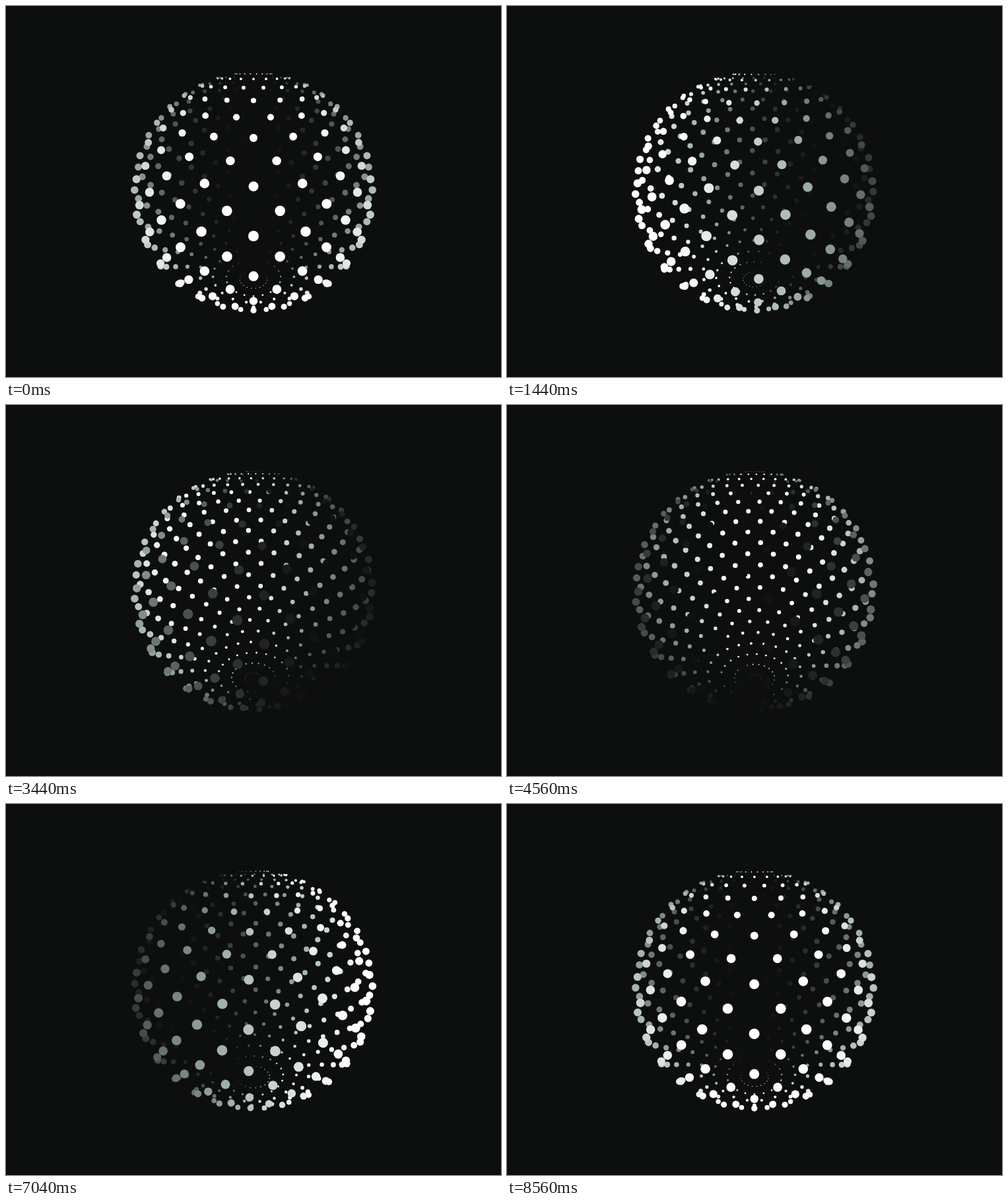
Recreate the animation shown at these times as an HTML page with a canvas. Size 750x562 px, loop 8640 ms.

```html
<!DOCTYPE html>
<html lang="en">
<head>
<meta charset="utf-8">
<title>Dotted sphere</title>
<style>
  html, body { margin: 0; width: 100%; height: 100%; overflow: hidden; background: #0d0f0e; }
  canvas { display: block; width: 750px; height: 562px; }
</style>
</head>
<body>
<canvas id="stage" width="750" height="562"></canvas>
<script>
const ctx = document.getElementById('stage').getContext('2d');
const W = 750, H = 562;
const LOOP = 8640, STEP = 80;
const RINGS = 22, PER_RING = 20;
const TILT = 0.4, DISTANCE = 2.6, FOCAL = 433.2, DOT = 0.0305;
const SIN = Math.sin(TILT), COS = Math.cos(TILT), TAU = Math.PI * 2;

const DARK = [13, 15, 14], MID = [163, 179, 175], WHITE = [255, 255, 255];
const MID_AT = 0.62, WHITE_AT = 0.95;

function mix(a, b, u) {
  return 'rgb(' + a.map((v, i) => Math.round(v + (b[i] - v) * u)).join(',') + ')';
}

function shade(light) {
  return light < MID_AT
    ? mix(DARK, MID, light / MID_AT)
    : mix(MID, WHITE, Math.min(1, (light - MID_AT) / (WHITE_AT - MID_AT)));
}

// Each dot slides down one ring and sideways half a gap per loop.
function makeDots(t) {
  const dots = [];
  for (let k = 0; k < RINGS; k++) {
    const theta = (k + t) * Math.PI / RINGS;
    const ring = Math.sin(theta), up = Math.cos(theta);
    for (let j = 0; j < PER_RING; j++) {
      const phi = (j + (k + t) / 2) * TAU / PER_RING;
      const front = ring * Math.cos(phi);
      const z = front * COS + up * SIN;
      const scale = FOCAL / (DISTANCE - z);
      dots.push({
        z,
        x: W / 2 + ring * Math.sin(phi) * scale,
        y: H / 2 - (up * COS - front * SIN) * scale,
        r: DOT * ring * scale,
        light: (1 + Math.cos(phi + TAU * t)) / 2
      });
    }
  }
  return dots.sort((a, b) => a.z - b.z);
}

function draw(t) {
  ctx.fillStyle = mix(DARK, DARK, 0);
  ctx.fillRect(0, 0, W, H);
  for (const d of makeDots(t)) {
    ctx.fillStyle = shade(d.light);
    ctx.beginPath();
    ctx.arc(d.x, d.y, d.r, 0, TAU);
    ctx.fill();
  }
}

const start = performance.now();
function tick() {
  const ms = (performance.now() - start) % LOOP;
  draw(Math.floor(ms / STEP) * STEP / LOOP);
  requestAnimationFrame(tick);
}
tick();
</script>
</body>
</html>
```
